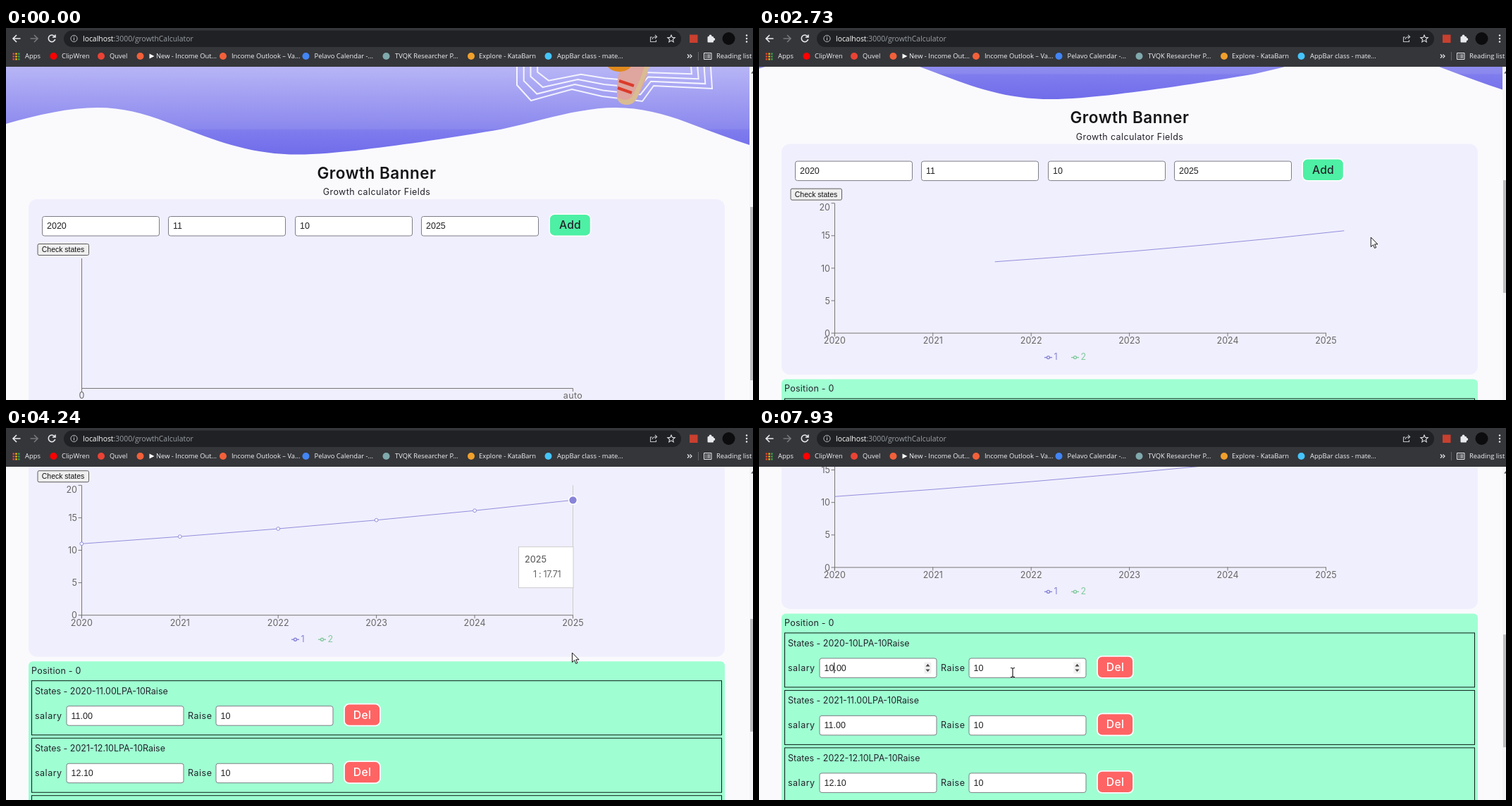
These frames come from a looping animation (1060x528 px, 8000 ms). An HTML page:

```html
<!DOCTYPE html>
<html lang="en">
<head>
<meta charset="utf-8">
<title>Growth calculator</title>
<style>
html, body { margin: 0; width: 100%; height: 100%; overflow: hidden; background: #fafafd; }
svg { display: block; }
text { font-family: Inter, sans-serif; font-size: 12.5px; fill: #23232b; white-space: pre; }
.h { font-size: 22.5px; font-weight: 600; fill: #151518; }
.btn { font-size: 15.7px; font-weight: 500; }
.in { font-family: "Liberation Sans", Arial, sans-serif; fill: #222; }
.chk { font-family: "Liberation Sans", Arial, sans-serif; font-size: 10.45px; fill: #111; }
.ax { fill: #666; }
.url { font-family: "Open Sans", sans-serif; font-size: 10.4px; fill: #9aa0a6; }
.bm { font-family: "Open Sans", sans-serif; font-size: 9.4px; fill: #f1f3f4; }
</style>
</head>
<body>
<svg id="stage" width="1060" height="528" viewBox="0 0 1060 528"></svg>
<script>
const LOOP = 8000, NOTCH = 78.4, ADDED = 1700, GROW = 2100, EDIT = 7790, DRAW = 1500;
const PURPLE = '#8884d8', GREEN = '#82ca9d';

const rect = (x, y, w, h, r, fill, more = '') =>
  `<rect x="${x}" y="${y}" width="${w}" height="${h}" rx="${r}" fill="${fill}" ${more}/>`;
const circle = (x, y, r, fill, more = '') => `<circle cx="${x}" cy="${y}" r="${r}" fill="${fill}" ${more}/>`;
const path = (d, stroke, w = 1, fill = 'none') => `<path d="${d}" fill="${fill}" stroke="${stroke}" stroke-width="${w}"/>`;
const text = (x, y, s, cls = '', gap = 0, more = '') =>
  `<text x="${x}" y="${y}" class="${cls}" letter-spacing="${gap}" ${more}>${s}</text>`;
const mid = 'text-anchor="middle"', end = 'text-anchor="end"';

const clamp = u => Math.max(0, Math.min(1, u));
const smooth = (t, a, b) => { const u = clamp((t - a) / (b - a)); return u * u * (3 - 2 * u); };
const lerp = (a, b, k) => a + (b - a) * k;

// cubic-bezier(.25, .1, .25, 1)
function ease(x) {
  x = clamp(x);
  let lo = 0, hi = 1;
  for (let i = 0; i < 24; i++) {
    const u = (lo + hi) / 2;
    if (.75 * u * (1 - u) + u ** 3 < x) lo = u; else hi = u;
  }
  return .3 * lo * (1 - lo) ** 2 + 3 * lo * lo * (1 - lo) + lo ** 3;
}

const field = (x, y, value) =>
  rect(x + .5, y + .5, 166, 27.5, 3, '#fff', 'stroke="#7d7d86"') + text(x + 7, y + 18.3, value, 'in');

const spinner = (x, y) => rect(x - 5, y - 8, 10, 16, 1, '#efefef') +
  path(`M${x - 3} ${y - 2}h6l-3-3.6zM${x - 3} ${y + 2}h6l-3 3.6z`, 'none', 0, '#444');

function hero() {
  const wave = 'M0 136C45 123 90 113 130 113C165 113 195 121 228 133.5C290 156 340 179.5 415 179.5' +
    'C470 179.5 590 163 704 143.5C760 131 815 113 865 113C900 113 935 122 965 133.5C995 145 1025 156 1055 166V40H0Z';
  let web = '';
  for (let i = 0; i < 4; i++) {
    const k = 1 - i * .07, px = x => 864 + (x - 864) * k, py = y => 40 + (y - 40) * (1 - i * .15);
    web += 'M' + [[725, 40], [725, 81], [745, 103], [803, 87], [846, 97], [903, 104], [919, 82], [1002, 86], [999, 40]]
      .map(([x, y]) => px(x) + ' ' + py(y)).join('L');
  }
  return `<defs><linearGradient id="sky" gradientUnits="userSpaceOnUse" x1="0" y1="55" x2="0" y2="180">
    <stop offset="0" stop-color="#b7b5f6"/><stop offset=".7" stop-color="#8b88ee"/>
    <stop offset=".72" stop-color="#7f7cee"/><stop offset="1" stop-color="#706cea"/></linearGradient></defs>` +
    path(wave, 'none', 0, 'url(#sky)') +
    `<g opacity=".85">${path(web, '#fff', 2)}</g>` +
    path('M873 50Q866 72 867 98Q869 109 882 109Q892 108 896 98Q910 74 913 50Z', 'none', 0, '#dfa59f') +
    path('M867 98Q869 109 882 109Q892 108 896 98L913 55L906 55Q897 82 888 98Q880 106 867 98Z', 'none', 0, '#d9bc92') +
    path('M851 50Q856 62 871 62Q886 61 889 50Z', 'none', 0, '#e08a1e') +
    path('M870 75L891 82M868 85L888 92', '#db3b2b', 4);
}

function form() {
  return text(526, 213.8, 'Growth Banner', 'h', .5, mid) +
    text(526, 237.3, 'Growth calculator Fields', '', .4, mid) +
    rect(32, 243, 988, 327.5, 12, '#f0effd') +
    ['2020', '11', '10', '2025'].map((v, i) => field(51 + Math.round(i * 179.4), 267, v)).join('') +
    rect(771.2, 264.2, 58.4, 31, 7, '#4df0a4', 'stroke="#fff" stroke-width="1.6"') +
    text(800.5, 285.3, 'Add', 'btn', .2, mid) +
    rect(45, 306.5, 72.5, 16, 2, '#efefef', 'stroke="#5c5c5c"') + text(81, 318, 'Check states', 'chk', 0, mid) +
    path('M107.5 327V516M107 511.5H804.5V516', '#777');
}

const px = i => 107.3 + 139.44 * i, py = v => 511.5 - 9.22 * v;
const salary = (base, i) => base * 1.1 ** i;

function chart(t) {
  if (t < ADDED) return text(107.5, 526.3, '0', 'ax', 0, mid) + text(804.5, 526.3, 'auto', 'ax', .4, mid);
  let s = '';
  for (let i = 0; i < 6; i++) {
    s += path(`M${px(i)} 511V516`, '#777') + text(px(i), 526.3, 2020 + i, 'ax', 0, mid);
    if (i < 5) s += path(`M102.5 ${py(5 * i)}H107`, '#777') +
      text(101, py(5 * i) + (i == 4 ? 10.5 : 4.7), 5 * i, 'ax', 0, end);
  }
  [[410.5, PURPLE], [448.5, GREEN]].forEach(([x, c], i) => {
    s += path(`M${x - 5.5} 546H${x + 5.5}`, c, 1.4) + circle(x, 546, 2, '#f0effd', `stroke="${c}" stroke-width="1.4"`) +
      text(x + 8, 549.8, i + 1, '', 0, `style="fill:${c}"`);
  });
  if (t < GROW) return s;

  const grow = ease((t - GROW) / DRAW), edit = ease((t - EDIT) / DRAW);
  const points = [...Array(6).keys()].map(i => [
    lerp(894, px(i), grow),
    lerp(410.5, py(lerp(salary(11, i), salary(10, i), edit)), grow)
  ]);
  s += path('M' + points.map(p => p.join(' ')).join('L'), PURPLE, .9);
  if (t >= GROW + DRAW && t < EDIT)
    for (const [x, y] of points) s += circle(x, y, 2.4, '#fff', `stroke="${PURPLE}" stroke-width=".9"`);
  if (t > 4030 && t < 4310) {
    const [x, y] = points[5];
    s += path(`M${x} 327V511`, '#ccc') + circle(x, y, 6, PURPLE, 'stroke="#fff" stroke-width="1.6"') +
      rect(727.5, 414.5, 77.5, 58, 0, '#fff', 'stroke="#ccc"') +
      text(736, 437.2, '2025', 'ax', 0, 'font-weight="500"') + text(748, 457.8, '1 : 17.71', 'ax', -.3);
  }
  return s;
}

function rows(t) {
  if (t < ADDED) return '';
  const edited = t >= EDIT;
  let s = rect(32, 577, 988, 600, 6, '#9fffd2') + text(36, 594.8, 'Position - 0', '', .25);
  for (let i = 0; i < 3; i++) {
    const y = 604.5 + 81.5 * i, v = salary(edited ? 10 : 11, i).toFixed(2);
    s += rect(36.5, y, 979, 77, 0, 'none', 'stroke="#0b1a14"') +
      text(41, y + 18.8, `States - ${2020 + i}-${edited && !i ? 10 : v}LPA-10Raise`) +
      text(41, y + 54, 'salary', '', .5) + field(85.5, y + 35.5, v) +
      text(258, y + 54, 'Raise', '', .5) + field(297.5, y + 35.5, '10') +
      rect(480, y + 33, 51, 31, 7, '#ff6464', 'stroke="#fff" stroke-width="1.8"') +
      text(505.5, y + 54, 'Del', 'btn', .3, mid + ' style="fill:#fff"');
  }
  if (t > 5050) s += spinner(239.5, 654);
  if (t > 7840) s += spinner(451.5, 654);
  if (t > 5590) s += path('M106.8 646.5V661.5', '#000');
  return s;
}

function toolbar() {
  const icon = '#e8eaed';
  let s = rect(0, 0, 1060, 55, 0, '#35363a') + rect(82, 3.5, 876, 23.5, 11.7, '#202124') +
    path('M20.5 15H10M15 10L10 15L15 20', icon, 1.6) +
    path('M34.5 15H45M40 10L45 15L40 20', '#77787c', 1.6) +
    path('M69 12A4.8 4.8 0 1 0 69.7 16M70 9.5V13H66', icon, 1.6) +
    circle(96.5, 15, 4.6, 'none', 'stroke="#bdc1c6"') + path('M96.5 14V17.6M96.5 12V13.1', '#bdc1c6', 1.1) +
    text(109, 18.8, '<tspan fill="#fff">localhost</tspan>:3000/growthCalculator', 'url') +
    path('M917 13H914.5V19.5H922.5V17M917 16Q917.5 12.5 923 12.5M921 10L923.7 12.5L921 15', '#bdc1c6', 1.1) +
    path('M944 10l1.5 3.4 3.7.3-2.8 2.5.8 3.7-3.2-2-3.2 2 .8-3.7-2.8-2.5 3.7-.3z', '#dadce0', 1.1) +
    rect(970, 9.5, 11.5, 11.5, 0, '#c8402f') +
    rect(995.5, 12, 8.5, 8.5, 1, icon) + circle(999.5, 11.5, 2, icon) + circle(1004.2, 16, 2, icon) +
    circle(1025.5, 15, 9, '#0c0c0e') + [10.5, 15, 19.5].map(y => circle(1051, y, 1.2, icon)).join('');

  const dots = ['#ea4335', '#fbbc04', '#34a853', '#4285f4'];
  for (let i = 0; i < 9; i++)
    s += rect(9.5 + i % 3 * 3.8, 35.5 + Math.floor(i / 3) * 3.8, 2.4, 2.4, 0, dots[(i + Math.floor(i / 3)) % 4]);
  s += text(27, 43.3, 'Apps', 'bm');
  [
    [67.5, '#f00', 79, 'ClipWren'], [135, '#ea4335', 147, 'Quvel'],
    [190.5, '#f2603a', 213, 'New - Income Out...'], [308, '#f2603a', 320, 'Income Outlook – Va...'],
    [425.5, '#4285f4', 437.5, 'Pelavo Calendar -...'], [539.5, '#7fa9ad', 552, 'TVQK Researcher P...'],
    [660, '#f0a02c', 671, 'Explore - KataBarn'], [769.5, '#45c4fa', 782, 'AppBar class - mate...']
  ].forEach(([x, c, tx, label]) => s += circle(x, 40, 5, c) + text(tx, 43.3, label, 'bm'));
  return s + path('M203.5 36.5L210.5 40L203.5 43.5Z', 'none', 0, '#fff') +
    path('M967 37.5L969.5 40L967 42.5M970.5 37.5L973 40L970.5 42.5', icon, 1.2) +
    path('M982.5 34V46', '#5f6368') +
    path('M990.5 35.5H1001V44.5H990.5ZM992.5 38H994M995 38H999.5M992.5 40H994M995 40H999.5M992.5 42H994M995 42H999.5', icon, 1) +
    text(1008, 43.3, 'Reading list', 'bm');
}

function scrollbar(t, scroll) {
  const [y, h] = t < ADDED ? [254, 246] : [190.3 + scroll * .328, 160];
  return rect(1055, 55, 5, 473, 0, '#f4f4f6') + path('M1057 64.5L1060 61V64.5Z', 'none', 0, '#555') +
    rect(1056, y, 4, h, 0, '#bcbcbf');
}

// time, x, y
const route = [
  [260, 1060, 528], [680, 894, 348], [950, 894, 348], [1370, 795, 278], [2100, 795, 278], [2660, 868.5, 297],
  [2730, 868.5, 297], [2870, 841, 304], [3610, 806.8, 316], [3830, 806.8, 316], [4240, 803.5, 319], [4510, 786, 323],
  [4860, 226, 358], [5200, 130, 342], [5350, 114, 339], [5550, 111, 339], [5890, 98, 339], [6440, 97, 339],
  [6780, 107, 339], [7440, 107, 339], [7930, 360, 347], [LOOP, 360, 347]
];

function pointer(t) {
  if (t < route[0][0]) return '';
  const i = route.findIndex(p => p[0] > t), [a, b] = [route[i - 1], route[i]];
  const k = (t - a[0]) / (b[0] - a[0]), x = lerp(a[1], b[1], k), y = lerp(a[2], b[2], k);
  const typing = t > 4860 && y < 354 && (x < 252 || x > 298);
  return `<g transform="translate(${x} ${y})">` + (typing
    ? path('M-3-6.5Q0-6.5 0-5Q0-6.5 3-6.5M0-5V5M-3 6.5Q0 6.5 0 5Q0 6.5 3 6.5', '#111', 1.1)
    : path('M0 0V13.5L3.2 10.6L5.3 15.4L7.4 14.5L5.3 9.8H9.6Z', '#000', .9, '#fff')) + '</g>';
}

const stage = document.getElementById('stage');
stage.innerHTML = `<g id="page">${hero()}${form()}<g id="data"></g></g><g id="bar"></g>${toolbar()}<g id="mouse"></g>`;
const [page, data, bar, mouse] = ['page', 'data', 'bar', 'mouse'].map(id => document.getElementById(id));
const start = performance.now();

function frame() {
  const t = (performance.now() - start) % LOOP;
  const scroll = NOTCH * (smooth(t, 2300, 2600) + 3 * smooth(t, 3730, 4522));
  page.setAttribute('transform', `translate(0 ${-scroll})`);
  data.innerHTML = chart(t) + rows(t);
  bar.innerHTML = scrollbar(t, scroll);
  mouse.innerHTML = pointer(t);
  requestAnimationFrame(frame);
}
frame();
</script>
</body>
</html>
```
